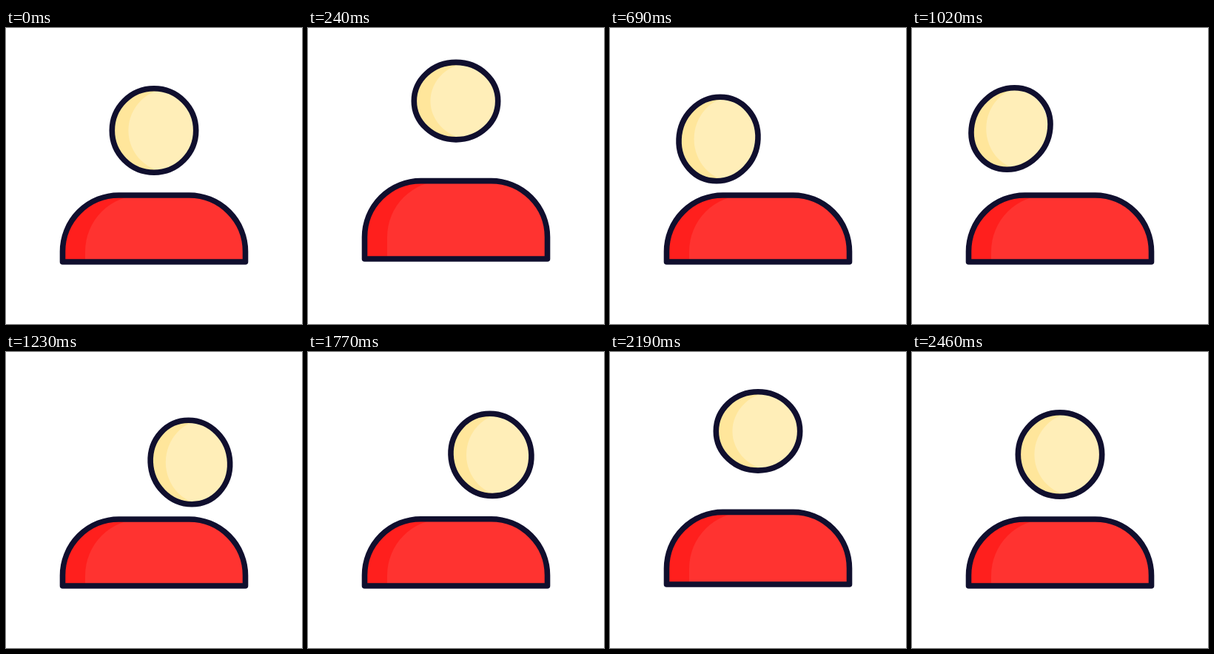
These frames come from a looping animation (400 px wide and 400 px high, 4520 ms). An HTML page:

```html
<!DOCTYPE html>
<html lang="en">
<head>
<meta charset="utf-8">
<title>Bobbing figure</title>
<style>
html, body { margin: 0; width: 100%; height: 100%; overflow: hidden; background: #fff; }
svg { display: block; width: 100vw; height: 100vh; }
.line { fill: none; stroke: #100f2e; stroke-width: 7.6; stroke-linejoin: round; vector-effect: non-scaling-stroke; }
</style>
</head>
<body>
<svg viewBox="0 0 400 400">
  <defs>
    <clipPath id="skin"><circle r="1"/></clipPath>
    <clipPath id="torso"><path class="body"/></clipPath>
  </defs>
  <path class="body" fill="#ff1f1d"/>
  <g clip-path="url(#torso)"><path id="bodyLight" fill="#ff3330"/></g>
  <path class="body line"/>
  <g id="face">
    <circle r="1" fill="#ffe69b"/>
    <g clip-path="url(#skin)"><circle cx=".39" r="1" fill="#ffeeb8"/></g>
  </g>
  <circle id="rim" class="line" r="1"/>
</svg>
<script>
const LOOP = 4520, STEP = 30;

// Eased 0 to 1 between two times.
function ease(t, from, to) {
  const u = Math.min(1, Math.max(0, (t - from) / (to - from)));
  return u * u * (3 - 2 * u);
}

// Up to 1, optionally held, and back to 0.
const pulse = (t, from, peak, to, hold = 0) =>
  ease(t, from, peak) * (1 - ease(t, peak + hold, to));

function poseAt(t) {
  const jump = pulse(t, 0, 300, 520) + pulse(t, 1670, 2000, 2460, 40);
  const side = -ease(t, 360, 675) + 2 * ease(t, 1020, 1260) - ease(t, 1708, 2004);
  const dive = pulse(t, 300, 480, 600);
  const windUp = pulse(t, 900, 1020, 1140);
  const drag = pulse(t, 1770, 1980, 2100);
  const away = Math.abs(side);
  return {
    x: 200 + 53.5 * side - 13 * windUp,
    y: 138.5 - 44.5 * jump + 11.5 * away - 14 * windUp,
    rx: 56.7 - 3.2 * away * (1 - jump) + 5.8 * dive,
    ry: 56.7 - 5 * jump + 6 * dive - 1.5 * windUp,
    lean: -2.5 * side * (1 - jump) + 9.7 * dive + 2.5 * (windUp + drag),
    lift: jump ** 3
  };
}

const face = document.getElementById('face');
const rim = document.getElementById('rim');
const bodyLight = document.getElementById('bodyLight');
const bodies = document.querySelectorAll('.body');

function bodyPath(left, lift) {
  const right = 323.5, r = 76;
  const top = 226 - 27 * lift, base = 316 - 5.5 * lift;
  return `M${left} ${base}V${top + r}A${r} ${r} 0 0 1 ${left + r} ${top}` +
    `H${right - r}A${r} ${r} 0 0 1 ${right} ${top + r}V${base}Z`;
}

function draw(t) {
  const { x, y, rx, ry, lean, lift } = poseAt(t);
  const slip = Math.abs(lean) * 0.3;
  face.setAttribute('transform',
    `matrix(${rx - slip} 0 0 ${ry + slip / 2} ${x - slip} ${y})`);
  rim.setAttribute('transform',
    `matrix(${Math.sqrt(rx * rx - lean * lean)} 0 ${-lean} ${ry} ${x} ${y})`);
  bodies.forEach(b => b.setAttribute('d', bodyPath(76.5, lift)));
  bodyLight.setAttribute('d', bodyPath(107, lift));
}

const start = performance.now();
function tick() {
  const t = (performance.now() - start) % LOOP;
  draw(Math.floor(t / STEP) * STEP);
  requestAnimationFrame(tick);
}
tick();
</script>
</body>
</html>
```
